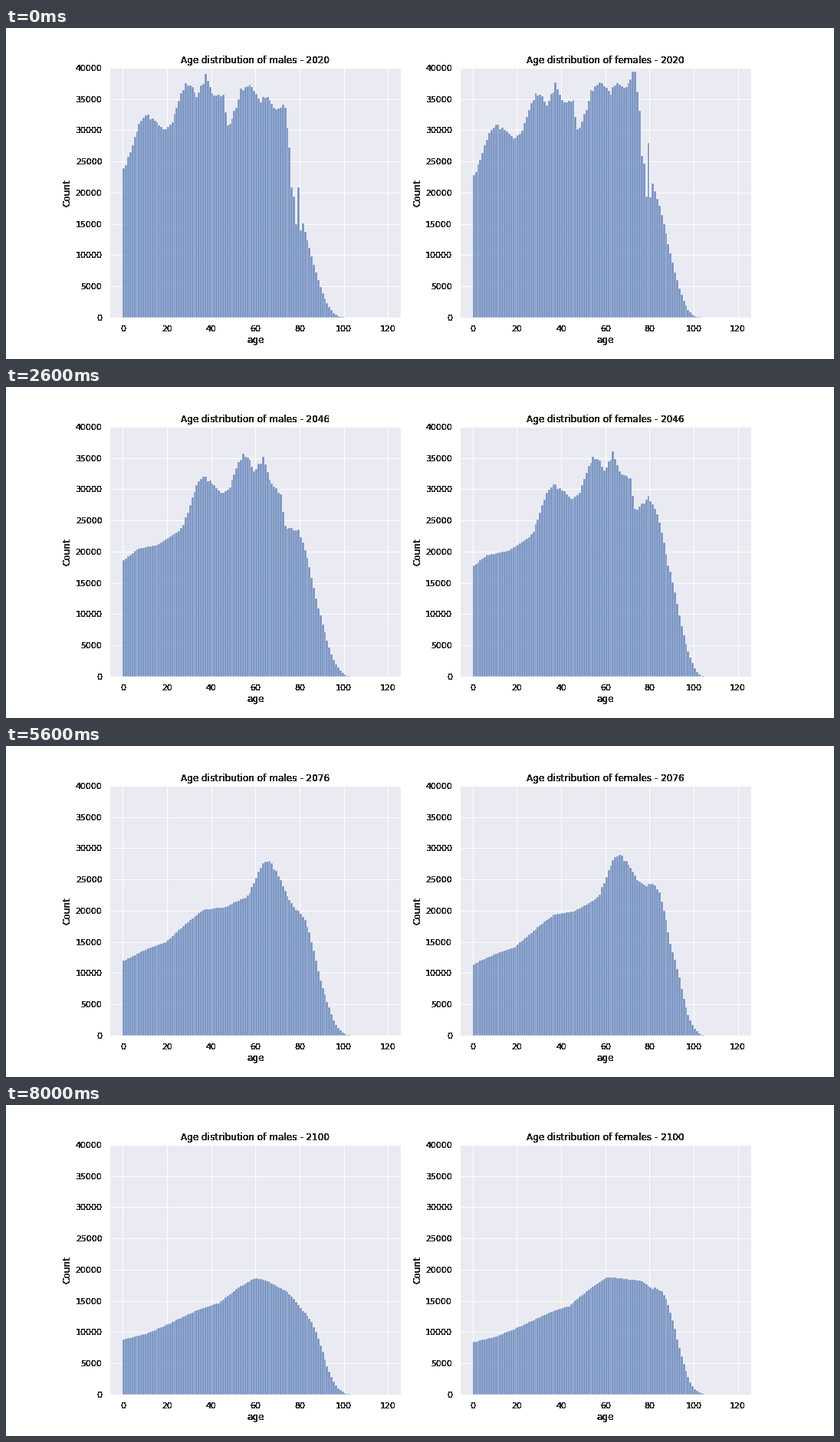
These frames come from a looping animation (1080 by 432 pixels, 8100 ms). A matplotlib script:

```python
import numpy as np
import matplotlib.pyplot as plt
from matplotlib.animation import FuncAnimation
from matplotlib.colors import to_rgb, to_rgba

FIRST, LAST = 2020, 2100
AGES = np.arange(120)
INK, PANEL, BLUE = "#262626", "#EAEAF2", "#4C72B0"

plt.rcParams.update({
    "font.family": "DejaVu Sans",
    "axes.titlesize": 12,
    "axes.labelsize": 12,
    "xtick.labelsize": 11,
    "ytick.labelsize": 11,
})

# Turning points of yearly male births (year, hundreds)
TURNS = np.array([
    (1939, 351), (1940, 298), (1941, 415), (1942, 280), (1943, 344),
    (1944, 351), (1945, 436), (1947, 495), (1951, 435), (1956, 423),
    (1958, 400), (1963, 411), (1967, 391), (1970, 346), (1973, 319),
    (1975, 369), (1980, 371), (1983, 392), (1987, 359), (1989, 377),
    (1992, 378), (1995, 349), (1998, 313), (2002, 300), (2006, 316),
    (2010, 324), (2013, 310), (2016, 276), (2020, 237), (2030, 212),
    (2040, 204), (2047, 183), (2057, 150), (2066, 138), (2080, 113),
    (2090, 97.5), (2100, 88.5)])
GIRLS_PER_BOY = 0.953
PAST_MORTALITY = 1.4  # losses before the first year, relative to later ones

# Year-to-year wobble of the recorded cohorts
years = np.arange(FIRST - len(AGES), LAST + 1)
wobble = np.random.default_rng(4).normal(0, 0.006, len(years))
births = 100 * np.interp(years, *TURNS.T) * (1 + wobble * (years <= FIRST))


def population(t, share, scale, rate, cubic):
    """Head count per age, t years after the first."""
    def hazard(age):
        return scale * np.exp(rate * age) + cubic * age ** 3.0

    entry = np.maximum(AGES - t, 0)
    past = PAST_MORTALITY * hazard(entry)
    future = hazard(AGES) - hazard(entry)
    return share * births[len(AGES) + t - AGES] * np.exp(-past - future)


SEXES = {
    "males": (1, 3.4e-5, 0.118, 2.3e-7),
    "females": (GIRLS_PER_BOY, 5.09e-6, 0.134, 1.0e-7),
}


def harden(image, dpi):
    """Turn antialiased lettering into solid pixels."""
    solid = np.zeros_like(image)
    solid[image[..., 3] > 0.1] = to_rgba(INK)
    return solid, 0, 0


def set_scale(ax):
    ax.set(xlim=(-6, 126), ylim=(0, 40000),
           xticks=range(0, 121, 20), yticks=range(0, 40001, 5000))


def make_panel(ax, sex):
    ax.set_facecolor(PANEL)
    ax.set_axisbelow(True)
    ax.grid(color="white", lw=1)
    ax.spines[:].set(color="white", linewidth=1.25)
    bars = ax.bar(AGES, population(0, *SEXES[sex]), width=1, align="edge",
                  facecolor=(*to_rgb(BLUE), 0.75), edgecolor="white", lw=0.288)
    set_scale(ax)
    ax.tick_params(length=0, labelbottom=False, labelleft=False)

    # All lettering sits on its own layer
    text = fig.add_axes(ax.get_position(), frameon=False)
    set_scale(text)
    text.set(xlabel="age", ylabel="Count")
    text.tick_params(length=6, bottom=False, left=False)
    text.set_agg_filter(harden)
    return sex, bars, text.set_title("")


fig, axes = plt.subplots(1, 2, figsize=(15, 6), dpi=72, facecolor="white")
fig.subplots_adjust(left=0.125, right=0.9, bottom=0.125, top=0.88, wspace=0.2)
panels = [make_panel(ax, sex) for ax, sex in zip(axes, SEXES)]


def update(t):
    for sex, bars, title in panels:
        for bar, height in zip(bars, population(t, *SEXES[sex])):
            bar.set_height(height)
        title.set_text(f"Age distribution of {sex} - {FIRST + t}")
    return []


anim = FuncAnimation(fig, update, frames=LAST - FIRST + 1, interval=100,
                     init_func=lambda: update(0), repeat=True, repeat_delay=0)
plt.show()
```
